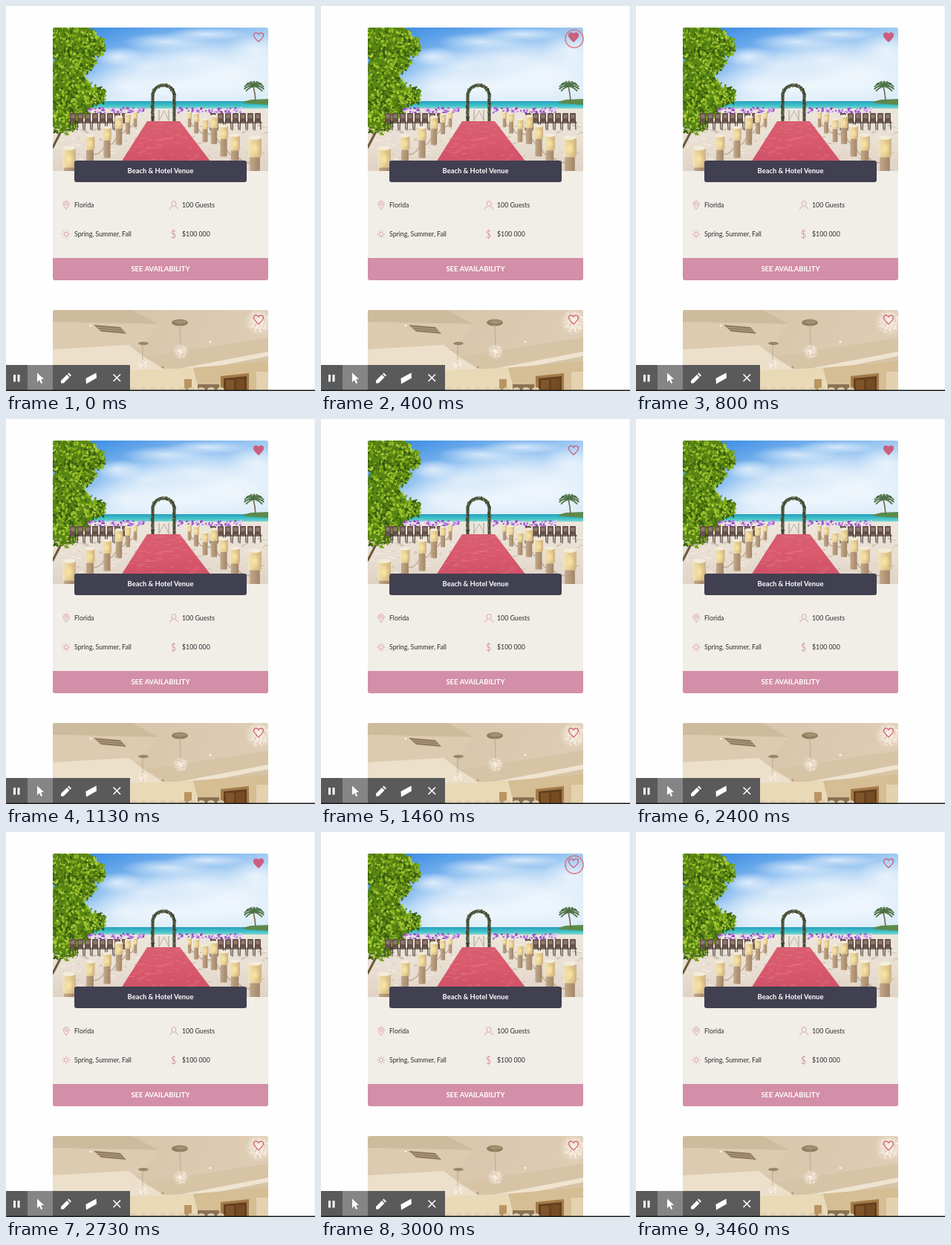
An HTML page with a canvas for the animation above (3530 ms loop, 416 by 518 pixels).

```html
<!DOCTYPE html>
<html lang="en">
<head>
<meta charset="utf-8">
<title>Venue card</title>
<style>
html, body { margin: 0; width: 100%; height: 100%; overflow: hidden; background: #fdfefd; }
canvas { display: block; width: 416px; height: 518px; }
</style>
</head>
<body>
<canvas id="stage" width="416" height="518"></canvas>
<script>
const W = 416, H = 518, LOOP = 3530, RING_LIFE = 255;
const CLICKS = [280, 1200, 2050, 2880];
const PINK = '#cb5f7f', TAU = Math.PI * 2;
const stage = document.getElementById('stage').getContext('2d');
const scene = document.createElement('canvas');
scene.width = W;
scene.height = H;
let c = scene.getContext('2d');

let seed = 11;
function rnd(a = 0, b = 1) {
  seed = (seed * 16807) % 2147483647;
  return a + (b - a) * seed / 2147483647;
}
const pick = list => list[Math.floor(rnd(0, list.length))];

function rect(x, y, w, h, fill, radius = 0) {
  c.fillStyle = fill;
  c.beginPath();
  c.roundRect(x, y, w, h, radius);
  c.fill();
}
function oval(x, y, rx, ry, fill, turn = 0) {
  c.fillStyle = fill;
  c.beginPath();
  c.ellipse(x, y, rx, ry, turn, 0, TAU);
  c.fill();
}
function poly(fill, ...p) {
  c.fillStyle = fill;
  c.beginPath();
  for (let i = 0; i < p.length; i += 2) c.lineTo(p[i], p[i + 1]);
  c.fill();
}
function line(stroke, width, ...p) {
  c.strokeStyle = stroke;
  c.lineWidth = width;
  c.beginPath();
  for (let i = 0; i < p.length; i += 2) c.lineTo(p[i], p[i + 1]);
  c.stroke();
}
function fade(x0, y0, x1, y1, ...colors) {
  const g = c.createLinearGradient(x0, y0, x1, y1);
  colors.forEach((col, i) => g.addColorStop(i / (colors.length - 1), col));
  return g;
}
function glow(x, y, rx, ry, rgb, alpha) {
  c.save();
  c.translate(x, y);
  c.scale(rx, ry);
  const g = c.createRadialGradient(0, 0, 0, 0, 0, 1);
  g.addColorStop(0, `rgba(${rgb},${alpha})`);
  g.addColorStop(1, `rgba(${rgb},0)`);
  oval(0, 0, 1, 1, g);
  c.restore();
}
function text(str, x, y, font, fill, align = 'left') {
  c.font = font + ' Lato, sans-serif';
  c.textAlign = align;
  c.fillStyle = fill;
  c.fillText(str, x, y);
}
function clipped(x, y, w, h, radius, draw) {
  c.save();
  c.beginPath();
  c.roundRect(x, y, w, h, radius);
  c.clip();
  draw();
  c.restore();
}

function heart(x, y, filled) {
  c.beginPath();
  c.moveTo(x, y + 6);
  c.bezierCurveTo(x - 4, y + 2.6, x - 6.5, y + 0.5, x - 6.5, y - 2.4);
  c.bezierCurveTo(x - 6.5, y - 6.6, x - 1.7, y - 7, x, y - 3.8);
  c.bezierCurveTo(x + 1.7, y - 7, x + 6.5, y - 6.6, x + 6.5, y - 2.4);
  c.bezierCurveTo(x + 6.5, y + 0.5, x + 4, y + 2.6, x, y + 6);
  c.closePath();
  c.strokeStyle = c.fillStyle = PINK;
  c.lineWidth = 1.25;
  if (filled) c.fill();
  c.stroke();
}

function skyAndSea() {
  rect(63, 29, 290, 100, fade(120, 29, 150, 130, '#3f8fe4', '#8abdf0', '#dcecf8'));
  const clouds = [[190, 82, 75, 32], [255, 72, 70, 30], [305, 95, 70, 34], [160, 108, 65, 25],
    [235, 108, 100, 24], [335, 60, 40, 22], [215, 48, 60, 12], [270, 38, 55, 9], [150, 68, 34, 13]];
  for (const [x, y, rx, ry] of clouds) glow(x, y, rx, ry, '246,250,254', 0.72);
  rect(63, 128, 290, 12, fade(0, 128, 0, 140, '#299fc0', '#3fc3c8', '#a9ded6'));
  poly('#5c8a4c', 318, 129, 330, 126, 353, 125, 353, 133, 322, 131);
  rect(63, 138, 290, 84, fade(0, 138, 0, 222, '#ece6dc', '#e9dfd3', '#dfd3c5'));
}

function palm() {
  line('#75644d', 1.6, 336, 128, 335, 118, 333, 108);
  c.lineCap = 'round';
  for (let i = 0; i < 11; i++) {
    const a = -Math.PI * 1.2 + i * Math.PI * 1.4 / 10;
    const dx = Math.cos(a) * 13, dy = Math.sin(a) * 7;
    c.strokeStyle = i % 2 ? '#3d6240' : '#5b7d4b';
    c.lineWidth = 1.8;
    c.beginPath();
    c.moveTo(334, 108);
    c.quadraticCurveTo(334 + dx * 0.6, 105 + dy, 334 + dx, 110 + dy);
    c.stroke();
  }
}

function foliage() {
  const clumps = [[76, 48, 28], [102, 45, 22], [120, 54, 15], [85, 84, 26], [108, 74, 14],
    [72, 118, 26], [101, 112, 16], [121, 121, 14], [78, 152, 21], [100, 135, 16]];
  line('#6b5a38', 3, 63, 190, 76, 165, 95, 130);
  for (const [x, y, r] of clumps) {
    oval(x, y, r * 0.85, r * 0.85, '#588414');
    for (let i = 0; i < r * 6; i++) {
      const a = rnd(0, TAU), d = r * Math.sqrt(rnd());
      const shades = ['#426c10', '#5d8c13', '#79a81a', '#93bd25', '#aacb3b', '#35580f'];
      oval(x + d * Math.cos(a), y + d * Math.sin(a), rnd(1.2, 3.2), rnd(0.8, 1.7), pick(shades), rnd(0, 3));
    }
  }
}

function chairs(x0, x1) {
  for (let x = x0; x < x1; x += 10) {
    rect(x, 144, 8, 12, '#685149', 1);
    rect(x + 1.5, 146, 5, 5, '#8c786d');
    line('#443832', 1.1, x + 0.5, 154, x, 167);
    line('#443832', 1.1, x + 7.5, 154, x + 8, 166);
    line('#51433c', 1.4, x, 157, x + 9, 157);
  }
}

function flowers(x0, x1) {
  for (let x = x0; x < x1; x += 13) {
    for (let i = 0; i < 12; i++)
      oval(x + rnd(-5, 5), 140 + rnd(-3, 4), 1.4, 1.3, pick(['#a460d5', '#c48be8', '#8745bd', '#dfc5ef']));
  }
}

function arch() {
  c.strokeStyle = '#46503c';
  c.lineWidth = 4;
  c.beginPath();
  c.moveTo(197.5, 155);
  c.lineTo(197.5, 121);
  c.arc(212, 121, 14.5, Math.PI, 0);
  c.lineTo(226.5, 155);
  c.stroke();
  for (let i = 0; i < 90; i++) {
    const s = rnd(-1.9, 1.9), top = Math.abs(s) < 1;
    const x = top ? 212 + Math.sin(s * Math.PI / 2) * 14.5 : 212 + Math.sign(s) * 14.5;
    const y = top ? 121 - Math.cos(s * Math.PI / 2) * 14.5 : 121 + (Math.abs(s) - 1) * 37;
    oval(x + rnd(-2, 2), y + rnd(-2, 2), 1, 1, pick(['#343b2c', '#626b4e', '#8b7766', '#4b5c36']));
  }
  rect(204, 138, 17, 2, '#eeeae5');
  line('#9e9a94', 1, 206, 140, 206, 154);
  line('#9e9a94', 1, 219, 140, 219, 154);
  line('#b8b2aa', 1, 206, 154, 213, 141, 219, 154);
}

function lantern(x, y, s) {
  rect(x - s * 0.38, y + s * 0.6, s * 0.76, s * 2.1, fade(x - s * 0.4, 0, x + s * 0.4, 0, '#c3a98b', '#a28567'), 1);
  rect(x - s * 0.5, y - s * 0.75, s, s * 1.5, fade(x - s / 2, 0, x + s / 2, 0, '#f1e4bd', '#e4cb91', '#d0b383'), s * 0.16);
  oval(x, y - s * 0.72, s * 0.48, s * 0.16, '#f4ecda');
  glow(x, y + s * 0.1, s * 0.4, s * 0.55, '255,233,163', 0.9);
}

function rope(points) {
  for (let i = 1; i < points.length; i++) {
    const [x0, y0, s0] = points[i - 1], [x1, y1, s1] = points[i];
    c.strokeStyle = '#c0ad97';
    c.lineWidth = 1.6;
    c.beginPath();
    c.moveTo(x0, y0 + s0);
    c.quadraticCurveTo((x0 + x1) / 2, Math.max(y0 + s0, y1 + s1) + 9, x1, y1 + s1);
    c.stroke();
  }
}

function beach() {
  skyAndSea();
  palm();
  foliage();
  for (let i = 0; i < 160; i++)
    oval(rnd(63, 353), rnd(160, 222), rnd(1, 4), rnd(0.4, 1), pick(['#d4c6b6', '#f4eee5', '#c8b9a9']));
  chairs(86, 158);
  chairs(275, 340);
  flowers(116, 188);
  flowers(234, 325);
  arch();
  poly(fade(0, 155, 0, 208, '#d85e70', '#d9596d', '#cf5268'), 190, 155, 234, 155, 276, 210, 155, 210);
  for (let i = 0; i < 50; i++) {
    const y = rnd(158, 208);
    oval(212 + rnd(-1, 1) * (20 + (y - 155) * 0.6), y, rnd(2, 6), 0.6, 'rgba(240,135,145,.4)');
  }
  const left = [[174, 147, 6], [164, 151, 8], [152, 157, 11], [136, 172, 12], [113, 184, 13], [85, 204, 18]];
  const right = [[247, 147, 6], [256, 150, 8], [268, 159, 9], [280, 156, 11], [293, 170, 12], [308, 184, 14], [335, 190, 18]];
  for (const row of [left, right]) {
    rope(row);
    row.forEach(p => lantern(...p));
  }
}

function pendant(x, y, r) {
  glow(x, y, r * 1.35, r * 1.35, '255,248,236', 0.95);
  for (let i = 0; i < r * 7; i++) {
    const a = rnd(0, TAU), d = r * Math.sqrt(rnd());
    oval(x + d * Math.cos(a), y + d * Math.sin(a), 0.8, 0.8, pick(['#fffaf1', '#f5e6d9', '#dcbfae']));
  }
}

function hall() {
  rect(63, 409, 290, 109, fade(63, 409, 353, 500, '#d3c2a5', '#d9c8ae', '#dfcdb5'));
  poly('#e3d5be', 63, 409, 108, 409, 180, 518, 63, 518);
  poly('#cdbb9d', 63, 425, 63, 409, 170, 409, 205, 428);
  poly('#dccbb0', 63, 425, 205, 428, 180, 462, 63, 462);
  poly('#ece0cb', 63, 462, 165, 456, 186, 472, 214, 490, 63, 494);
  poly('#d7c4a7', 186, 472, 353, 446, 353, 482, 228, 494);
  poly('#efe4d1', 228, 489, 353, 465, 353, 471, 232, 495);
  poly('#d5bd94', 167, 494, 353, 478, 353, 518, 167, 518);
  poly('#e9d9b7', 167, 490, 252, 487, 260, 518, 167, 518);
  poly('#8f795f', 118, 429, 154, 432, 162, 441, 128, 438);
  line('#b7a189', 1, 122, 432, 156, 435);
  line('#b7a189', 1, 125, 435, 159, 438);
  oval(234, 426, 11, 4.5, '#8f7c5c');
  oval(235, 425, 8, 2.6, '#a49071');
  oval(185, 454, 7, 2.2, '#9b8768');
  line('#b5a388', 0.8, 234, 428, 235, 458);
  line('#b5a388', 0.8, 184, 456, 184, 479);
  pendant(235, 465, 8);
  pendant(184, 482, 5);
  pendant(340, 425, 14);
  oval(114, 430, 1.6, 1.2, '#fff8e9');
  oval(275, 452, 1.6, 1.2, '#fff5df');
  oval(211, 486, 2, 1.5, '#b7a27e');
  poly('#a27b48', 289, 498, 327, 494, 327, 518, 289, 518);
  poly('#65401f', 293, 501, 324, 498, 324, 518, 293, 518);
  rect(296, 503, 11, 15, '#805529');
  rect(310, 502, 11, 16, '#764c24');
  rect(240, 502, 10, 16, '#b99562');
  rect(258, 509, 29, 9, '#8b7253');
  for (let x = 172; x < 290; x += 13) oval(x, 516, 5, 3, '#dccdb2');
  rect(337, 492, 16, 26, '#e4d1af');
}

function detailIcons() {
  const ink = '#d99bab';
  c.strokeStyle = ink;
  c.lineWidth = 0.9;
  c.beginPath();
  c.arc(81, 266.5, 4, Math.PI * 0.83, Math.PI * 0.17);
  c.lineTo(81, 273.5);
  c.closePath();
  c.moveTo(82.8, 266.5);
  c.arc(81, 266.5, 1.8, 0, TAU);
  c.stroke();

  c.beginPath();
  c.ellipse(226, 266, 3, 3.5, 0, 0, TAU);
  c.moveTo(220.5, 273.5);
  c.quadraticCurveTo(220.5, 270.7, 224, 270);
  c.moveTo(228, 270);
  c.quadraticCurveTo(231.5, 270.7, 231.5, 273.5);
  c.stroke();

  c.beginPath();
  c.arc(81, 307, 2.7, 0, TAU);
  c.stroke();
  for (let i = 0; i < 8; i++) {
    const x = Math.cos(i * TAU / 8), y = Math.sin(i * TAU / 8);
    line(ink, 0.9, 81 + x * 4, 307 + y * 4, 81 + x * 5.7, 307 + y * 5.7);
  }
  text('$', 225.5, 311.5, '300 13px', PINK, 'center');
}

function toolbar() {
  rect(0, 483, 167, 34, '#595a59');
  rect(29, 483, 34, 34, '#848584');
  rect(10, 496, 3, 9.5, '#fff');
  rect(15.5, 496, 3, 9.5, '#fff');
  poly('#fff', 42, 493.5, 51, 502, 47, 502.3, 49.2, 507, 47.2, 508, 45, 503.2, 42, 506);
  poly('#fff', 74, 507.5, 74, 504, 82, 496, 85.5, 499.5, 77.5, 507.5);
  poly('#fff', 83, 495, 84.5, 493.5, 88, 497, 86.5, 498.5);
  poly('#fff', 107.5, 501, 121.5, 493.5, 122, 500.5, 108, 508.5);
  line('#fff', 1.6, 144.5, 495.5, 154, 505);
  line('#fff', 1.6, 154, 495.5, 144.5, 505);
}

function drawScene() {
  rect(0, 0, W, H, '#fdfefd');
  rect(415, 0, 1, H, '#f1f2f1');
  rect(63, 29, 290, 340, '#f1ede7', 3);
  clipped(63, 29, 290, 193, [3, 3, 0, 0], beach);
  rect(63, 339, 290, 30, '#d38fa8', [0, 0, 3, 3]);
  rect(92, 208, 232, 29, '#414051', 3);
  text('Beach & Hotel Venue', 208, 225, '700 9.4px', '#fff', 'center');
  text('SEE AVAILABILITY', 208, 356.5, '700 9.4px', '#fff', 'center');
  const label = '8.75px', ink = '#302f33';
  text('Florida', 92, 271.2, label, ink);
  text('100 Guests', 237, 271.2, label, ink);
  text('Spring, Summer, Fall', 92, 310.2, label, ink);
  text('$100 000', 237, 310.2, label, ink);
  detailIcons();
  clipped(63, 409, 290, 120, 3, hall);
  heart(340, 422, false);
  toolbar();
  rect(0, 516.5, W, 1.5, '#191a19');
}

function clickRing(age) {
  const p = age / RING_LIFE;
  c.globalAlpha = 1 - p * p * 0.75;
  c.strokeStyle = '#df6668';
  c.lineWidth = 1.6;
  c.beginPath();
  c.arc(341, 44, 1 + 23.5 * p, 0, TAU);
  c.stroke();
  c.globalAlpha = 1;
}

function frame(now) {
  const t = now % LOOP;
  const clicked = CLICKS.filter(at => t >= at);
  c.drawImage(scene, 0, 0);
  heart(340, 42, clicked.length % 2 === 1);
  const age = t - clicked[clicked.length - 1];
  if (age < RING_LIFE) clickRing(age);
  requestAnimationFrame(tick);
}

let start;
function tick(now) {
  start ??= now;
  frame(Math.max(0, now - start));
}

drawScene();
c = stage;
frame(0);
</script>
</body>
</html>
```
